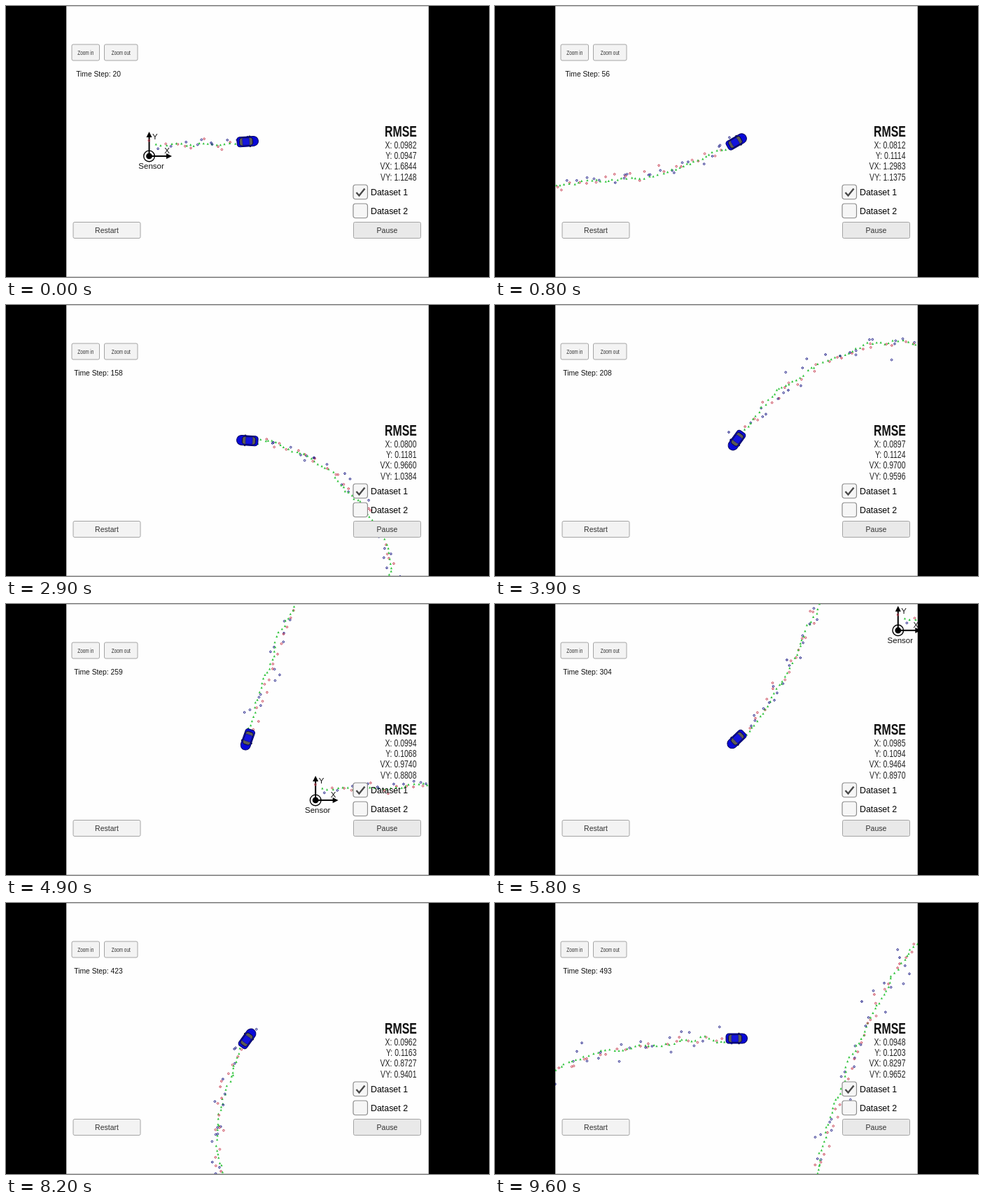
An HTML page with a canvas that plays this animation: 690x388 px, repeating every 9.7 s.

```html
<!DOCTYPE html>
<html lang="en">
<head>
<meta charset="utf-8">
<title>Kalman filter tracking</title>
<style>
  html, body { margin: 0; width: 690px; height: 388px; overflow: hidden; background: #000; }
  canvas { display: block; }
</style>
</head>
<body>
<canvas id="stage" width="690" height="388"></canvas>
<script>
const ctx = document.getElementById('stage').getContext('2d');
const LOOP = 9700, TICK = 100, SCALE = 24.3, DT = 0.05, STEPS = 500;
const CAR = { x: 345, y: 194 };
const FONT = '"Liberation Sans", Arial, sans-serif';
const SQUEEZE = 0.75; // the side panel and zoom buttons are scaled narrow

const KEYS = [
  { time: 0, step: 20, rmse: [0.0982, 0.0947, 1.6844, 1.1248] },
  { time: 1500, step: 87, rmse: [0.0664, 0.1260, 0.9604, 1.1487] },
  { time: 4900, step: 259, rmse: [0.0994, 0.1068, 0.9740, 0.8808] },
  { time: 9600, step: 493, rmse: [0.0948, 0.1203, 0.8297, 0.9652] }
];

let seed = 11;
function random() {
  seed = (seed * 16807) % 2147483647;
  return seed / 2147483647;
}
const gauss = sd => sd * Math.sqrt(-2 * Math.log(random())) * Math.cos(2 * Math.PI * random());

// Figure-eight drive with a sinusoidal yaw rate, in metres;
// lidar and radar readings alternate, the estimate drifts around the truth
function simulate() {
  const track = [];
  let x = 0.6, y = 0.7, driftX = -0.2, driftY = 0;
  for (let n = 0; n <= STEPS; n++) {
    const phase = 2 * Math.PI * n / STEPS;
    const yaw = 2.195 * (1 - Math.cos(phase));
    const isLidar = n % 2 === 0;
    let mx = x + gauss(0.15), my = y + gauss(0.15);
    if (!isLidar) {
      const range = Math.hypot(x, y) + gauss(0.3);
      const bearing = Math.atan2(y, x) + gauss(0.03);
      mx = range * Math.cos(bearing);
      my = range * Math.sin(bearing);
    }
    track.push({ x, y, yaw, isLidar, mx, my, ex: x + driftX, ey: y + driftY });
    driftX = driftX * 0.8 + gauss(0.055);
    driftY = driftY * 0.8 + gauss(0.065);
    const dist = (5.05 + 0.157 * Math.cos(2 * phase + 0.29)) * DT;
    x += dist * Math.cos(yaw + 0.01);
    y += dist * Math.sin(yaw + 0.01);
  }
  return track;
}
const track = simulate();

const mix = (a, b, k) => a + (b - a) * k;

function readState(time) {
  const i = KEYS.findIndex(key => time <= key.time) || 1;
  const a = KEYS[i - 1], b = KEYS[i];
  const k = (time - a.time) / (b.time - a.time);
  return {
    step: Math.round(mix(a.step, b.step, k)),
    rmse: a.rmse.map((v, j) => mix(v, b.rmse[j], k))
  };
}

function text(str, x, y, size, { align = 'center', color = '#111', weight = '', squeeze = 1 } = {}) {
  ctx.save();
  ctx.translate(x, y);
  ctx.scale(squeeze, 1);
  ctx.font = `${weight} ${size}px ${FONT}`;
  ctx.textAlign = align;
  ctx.fillStyle = color;
  ctx.fillText(str, 0, 0);
  ctx.restore();
}

function box(x, y, w, h, radius, fill, stroke, lineWidth = 1) {
  ctx.beginPath();
  ctx.roundRect(x, y, w, h, radius);
  ctx.fillStyle = fill;
  ctx.fill();
  ctx.strokeStyle = stroke;
  ctx.lineWidth = lineWidth;
  ctx.stroke();
}

// Upward triangle centred on x, y
function triangle(x, y, r, color) {
  ctx.beginPath();
  ctx.moveTo(x - r, y + r);
  ctx.lineTo(x, y - r);
  ctx.lineTo(x + r, y + r);
  ctx.fillStyle = color;
  ctx.fill();
}

function ring(x, y, r, color, width) {
  ctx.beginPath();
  ctx.arc(x, y, r, 0, 2 * Math.PI);
  ctx.strokeStyle = color;
  ctx.lineWidth = width;
  ctx.stroke();
}

function arrow(angle, length) {
  ctx.save();
  ctx.rotate(angle);
  ctx.fillStyle = '#000';
  ctx.fillRect(-1, -length + 5, 2, length - 5);
  triangle(0, -length + 4, 4, '#000');
  ctx.restore();
}

function drawSensor(x, y) {
  ctx.save();
  ctx.translate(x, y);
  ring(0, 0, 7.8, '#000', 1.4);
  ring(0, 0, 2.2, '#000', 4.4);
  arrow(0, 35);
  arrow(Math.PI / 2, 32.5);
  text('Y', 8.3, -23.7, 11.5);
  text('X', 25.5, -4.2, 11.5);
  text('Sensor', 3, 18, 11.5);
  ctx.restore();
}

function drawTrail(step, toScreen) {
  for (const p of track.slice(0, step)) {
    ring(...toScreen(p.mx, p.my), 1.3, p.isLidar ? '#c83c50' : '#141482', 1);
    triangle(...toScreen(p.ex, p.ey), 1.6, '#30c43c');
  }
}

function drawCar(yaw) {
  ctx.save();
  ctx.translate(CAR.x, CAR.y);
  ctx.rotate(-yaw);
  box(2.5, -8, 2, 16, 1, '#000', '#000', 0.6);
  box(-15, -7, 30.5, 14, [4, 7, 7, 4], '#0808d8', '#04045c');
  box(-11.5, -5.5, 19, 11, 3, '#5c5c54', '#040440', 0.9);
  box(-7, -5, 9.5, 10, 1.5, '#1414dc', '#0404a0', 0.6);
  ctx.restore();
}

function button(label, x, y, w, size, squeeze, fill = '#f3f3f3') {
  box(x, y, w, 23, 2, fill, '#a4a4a4');
  text(label, x + w / 2, y + 11.5 + size * 0.36, size, { color: '#333', squeeze });
}

function drawPanel(step, rmse) {
  button('Zoom in', 94, 55, 39.5, 8.5, SQUEEZE);
  button('Zoom out', 140.5, 55, 47.5, 8.5, SQUEEZE);
  button('Restart', 96, 309.5, 96, 10.5, 1);
  button('Pause', 496.5, 309.5, 96, 10.5, 1, '#e9e9e9');
  text('Time Step: ' + step, 132, 100.5, 10.3);

  text('RMSE', 564, 187, 21.2, { weight: 'bold', squeeze: SQUEEZE });
  ['X', 'Y', 'VX', 'VY'].forEach((name, i) =>
    text(`${name}: ${rmse[i].toFixed(4)}`, 586.5, 203.5 + i * 15.4, 14,
      { align: 'right', color: '#262626', squeeze: SQUEEZE }));

  for (const i of [0, 1]) {
    box(496, 256 + i * 27, 20.5, 20.5, 3.5, '#f6f6f6', '#8c8c8c', 1.2);
    text('Dataset ' + (i + 1), 521, 270.5 + i * 27, 12.4, { align: 'left', color: '#000' });
  }
  ctx.beginPath();
  ctx.moveTo(500.5, 267);
  ctx.lineTo(504.5, 271.5);
  ctx.lineTo(512.5, 261.5);
  ctx.strokeStyle = '#484848';
  ctx.lineWidth = 2.4;
  ctx.stroke();
}

function draw(time) {
  const { step, rmse } = readState(time);
  const car = track[step];
  const toScreen = (x, y) => [CAR.x + (x - car.x) * SCALE, CAR.y - (y - car.y) * SCALE];

  ctx.fillStyle = '#000';
  ctx.fillRect(0, 0, 690, 388);
  ctx.save();
  ctx.beginPath();
  ctx.rect(86, 0, 518, 388);
  ctx.clip();
  box(86.5, 0.5, 517, 387, 0, '#fefefe', '#c8c8c8');
  drawSensor(...toScreen(0, 0));
  drawTrail(step, toScreen);
  drawCar(car.yaw);
  drawPanel(step, rmse);
  ctx.restore();
}

const start = performance.now();
function loop() {
  const time = Math.max(0, performance.now() - start) % LOOP;
  draw(Math.floor(time / TICK) * TICK);
  requestAnimationFrame(loop);
}
loop();
</script>
</body>
</html>
```
